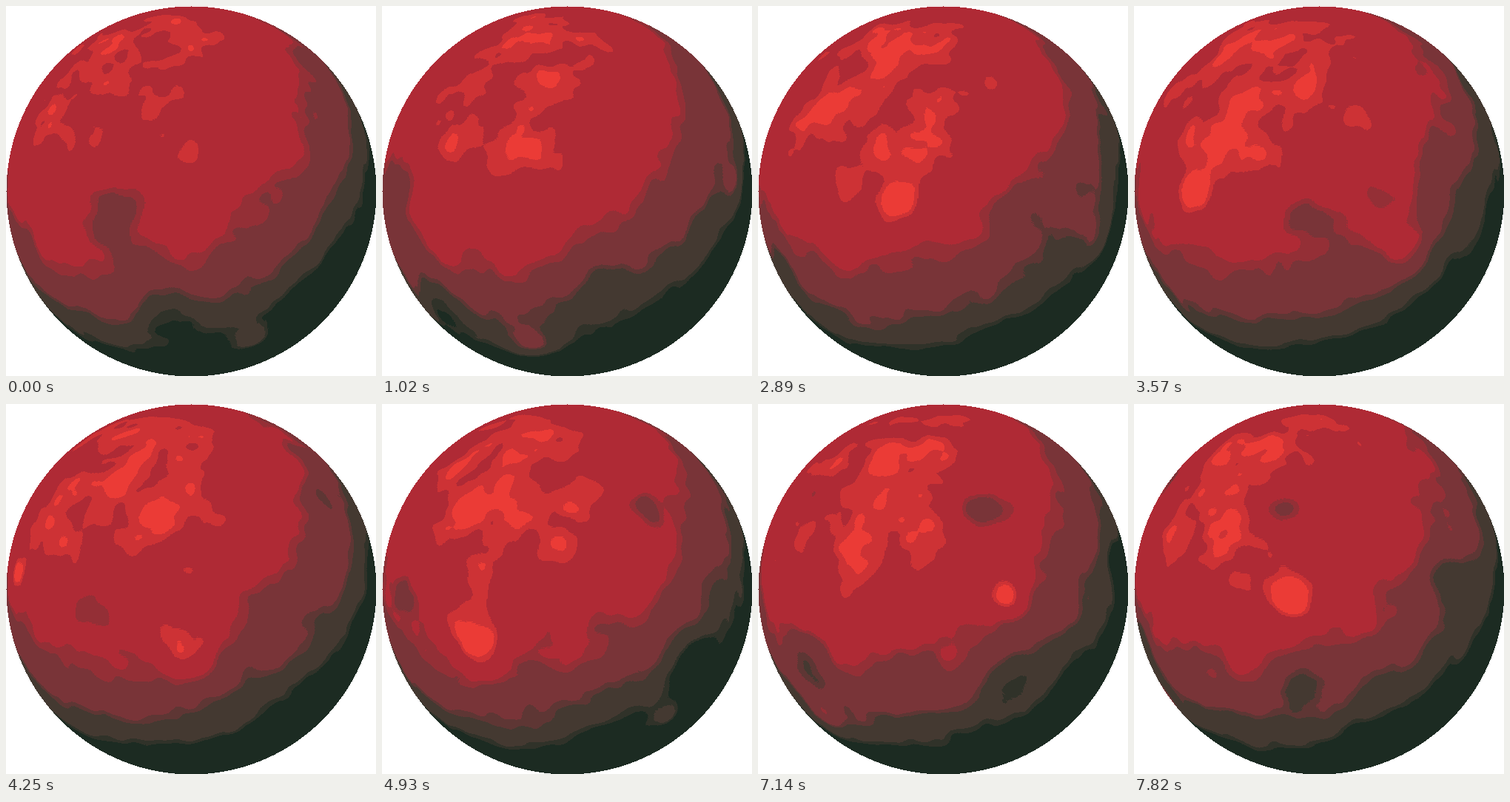
Animation, 500 px wide and 500 px high, one loop 7.99 s. Source, as an HTML page with a canvas:

```html
<!DOCTYPE html>
<html lang="en">
<head>
<meta charset="utf-8">
<title>Red planet</title>
<style>
  html, body { margin: 0; width: 100%; height: 100%; overflow: hidden; background: #fff; }
  canvas { display: block; width: 500px; height: 500px; }
</style>
</head>
<body>
<canvas id="stage" width="500" height="500"></canvas>
<script>
const SIZE = 500, RADIUS = 250;
const STEP_MS = 170, STEPS = 47, DEG_PER_STEP = 7.2;
const DEG = Math.PI / 180, TILT = 12 * DEG;
const LIGHT = [-0.36, 0.6, 0.71];
const PALETTE = [[28, 43, 34], [68, 57, 49], [121, 52, 56], [175, 42, 53], [235, 59, 54]];
const BAND = 0.085; // half width of the blended strip between two tones

// Main landmarks in degrees: longitude, latitude, radius. A negative radius darkens.
const LANDMARKS = [
  [-24, 5, -13], [-8, -29, -10], [27, -44, 8], [58, -20, -9], [108, 9, 6],
  [145, 5, -8], [179, -9, 10], [240, 37, -7], [252, -16, -10], [250, -36, 7],
  [317, 38, -8], [323, 9, 6], [325, -17, -9], [377, 13, -8]
];

// The surface map runs on past one full turn, so landmarks never wrap.
const CELLS = 3; // map cells per degree
const CELL = DEG / CELLS;
const MAP_W = Math.ceil((360 + STEPS * DEG_PER_STEP) * CELLS) + 2;
const MAP_H = 180 * CELLS + 1;
const map = new Float32Array(MAP_W * MAP_H);
const { sin, cos, max, min, round, floor, abs } = Math;

function hash(x, y, z) {
  let h = Math.imul(x, 374761393) ^ Math.imul(y, 668265263) ^ Math.imul(z, 1274126177);
  h = Math.imul(h ^ (h >>> 13), 1103515245);
  return ((h ^ (h >>> 16)) >>> 0) / 2147483648 - 1;
}

const mix = (a, b, t) => a + (b - a) * t;
const smooth = t => t * t * (3 - 2 * t);

function noise(x, y, z) {
  const i = floor(x), j = floor(y), k = floor(z);
  const u = smooth(x - i), v = smooth(y - j), w = smooth(z - k);
  const edge = (b, c) => mix(hash(i, b, c), hash(i + 1, b, c), u);
  const face = c => mix(edge(j, c), edge(j + 1, c), v);
  return mix(face(k), face(k + 1), w);
}

function addRoughness() {
  for (let row = 0; row < MAP_H; row++) {
    const y = cos(row * CELL), ring = sin(row * CELL);
    for (let col = 0; col < MAP_W; col++) {
      const x = ring * sin(col * CELL), z = ring * cos(col * CELL);
      map[row * MAP_W + col] = 0.28 * noise(5 * x, 5 * y, 5 * z) + 0.15 * noise(13 * x, 13 * y, 13 * z);
    }
  }
}

function addLandmark([lon, lat, size]) {
  const center = (lon + 180) * CELLS, middle = (90 - lat) * CELLS;
  const radius = abs(size) * CELLS, reach = radius * 2.6;
  const gain = size > 0 ? 1.2 : -0.95;
  for (let row = max(0, floor(middle - reach)); row <= min(MAP_H - 1, middle + reach); row++) {
    const squeeze = max(0.08, sin(row * CELL)), span = reach / squeeze;
    for (let col = max(0, floor(center - span)); col <= min(MAP_W - 1, center + span); col++) {
      const dx = (col - center) * squeeze / radius, dy = (row - middle) / radius;
      map[row * MAP_W + col] += gain * Math.exp(-dx * dx - dy * dy);
    }
  }
}

addRoughness();
LANDMARKS.forEach(addLandmark);

// Everything about a pixel that does not change as the globe turns.
const pixels = [];
for (let py = 0; py < SIZE; py++) {
  for (let px = 0; px < SIZE; px++) {
    const x = (px - 250) / RADIUS, y = (250 - py) / RADIUS, depth = 1 - x * x - y * y;
    if (depth < 0) continue;
    const z = Math.sqrt(depth);
    const up = y * cos(TILT) + z * sin(TILT), forward = z * cos(TILT) - y * sin(TILT);
    const col = round((Math.atan2(x, forward) + Math.PI) / CELL);
    const row = round(Math.acos(max(-1, min(1, up))) / CELL);
    const lit = x * LIGHT[0] + y * LIGHT[1] + z * LIGHT[2];
    pixels.push({
      at: py * SIZE + px,
      cell: row * MAP_W + col,
      shade: 0.85 + 4.2 * lit - 1.45 * lit * lit
    });
  }
}

const pack = ([r, g, b]) => (255 << 24 | b << 16 | g << 8 | r) >>> 0;
const tones = PALETTE.map(pack);
const blends = PALETTE.slice(1).map((tone, i) => pack(tone.map((v, k) => (v + PALETTE[i][k]) >> 1)));

function toneFor(value) {
  const edge = floor(value);
  if (edge >= 0 && edge < 4 && abs(value - edge - 0.5) < BAND) return blends[edge];
  return tones[max(0, min(4, round(value)))];
}

const context = document.getElementById("stage").getContext("2d");
const picture = context.createImageData(SIZE, SIZE);
const buffer = new Uint32Array(picture.data.buffer).fill(0xffffffff);

function draw(step) {
  const shift = round(step * DEG_PER_STEP * CELLS);
  for (const p of pixels) buffer[p.at] = toneFor(p.shade + map[p.cell + shift]);
  context.putImageData(picture, 0, 0);
}

let shown = -1;
const start = performance.now();
function tick() {
  const step = floor((performance.now() - start) / STEP_MS) % STEPS;
  if (step !== shown) draw(shown = step);
  requestAnimationFrame(tick);
}
tick();
</script>
</body>
</html>
```
